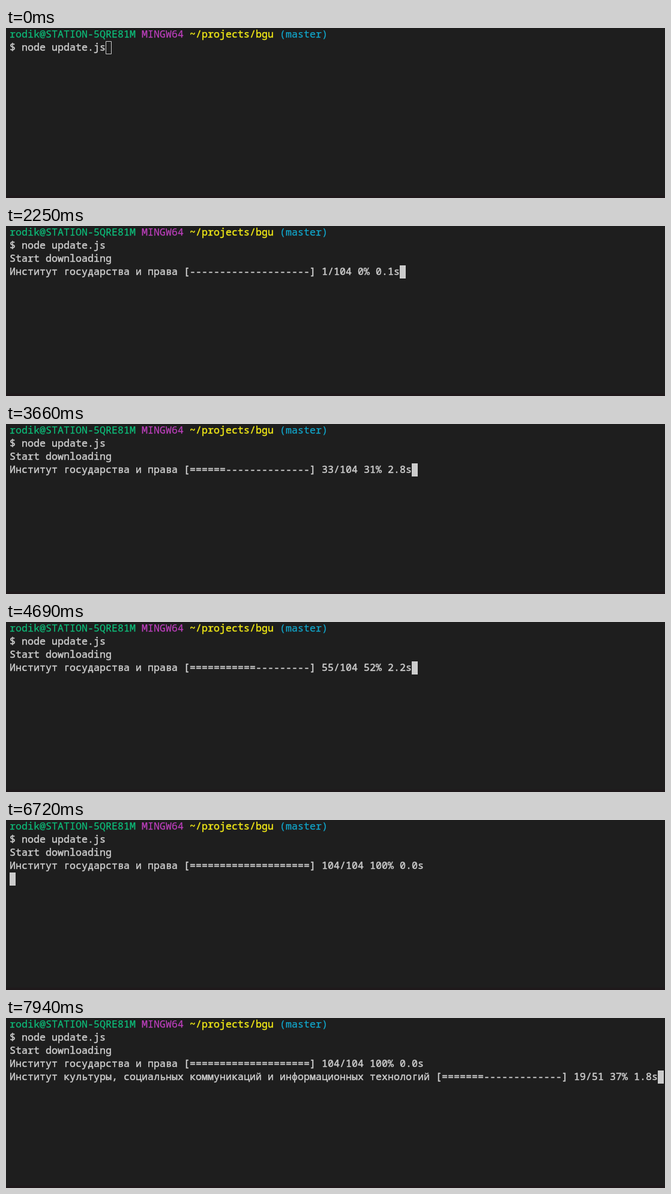
An HTML page with a canvas for the animation above (8000 ms loop, 1098 by 285 pixels).

```html
<!DOCTYPE html>
<html lang="en">
<head>
<meta charset="utf-8">
<title>Terminal download</title>
<style>
  html, body { margin: 0; width: 100%; height: 100%; overflow: hidden; background: #1e1e1e; }
  canvas { display: block; }
</style>
</head>
<body>
<canvas id="stage" width="1098" height="285"></canvas>
<script>
const ctx = document.getElementById('stage').getContext('2d');
const LOOP = 8000;
const CELL = 10, ROW = 22, LEFT = 6, BASELINE = 16;
const COLOR = {
  back: '#1e1e1e', edge: '#1f191b', text: '#cccccc',
  green: '#0dbc79', magenta: '#bc3fbc', yellow: '#eee616', cyan: '#11a8cd'
};

const PROMPT = [
  ['rodik@STATION-5QRE81M ', COLOR.green],
  ['MINGW64 ', COLOR.magenta],
  ['~/projects/bgu ', COLOR.yellow],
  ['(master)', COLOR.cyan]
];

// Key points: repaint number, items done, seconds elapsed
const JOBS = [
  {
    name: 'Институт государства и права', total: 104,
    keys: [[0, 1, 0.001], [7, 33, 1.3], [12, 55, 2.47], [17, 79, 3.48], [22, 104, 4.4]]
  },
  {
    name: 'Институт культуры, социальных коммуникаций и информационных технологий', total: 51,
    keys: [[23, 1, 0.002], [24, 6, 0.25], [28, 19, 1.07]]
  }
];

// The terminal repaints at a steady pace and misses one repaint in twelve
function repaintAt(t) {
  const n = Math.floor((t - 2235) / 203.3);
  return n % 12 === 6 ? n - 1 : n;
}

function interpolate(keys, n) {
  const next = keys.findIndex(key => key[0] > n);
  if (next < 0) return keys[keys.length - 1];
  const a = keys[next - 1], b = keys[next];
  const p = (n - a[0]) / (b[0] - a[0]);
  return a.map((value, i) => value + (b[i] - value) * p);
}

function write(text, col, row, color = COLOR.text) {
  ctx.fillStyle = ctx.strokeStyle = color;
  // Light and yellow text looks heavier than the other colours
  ctx.lineWidth = color === COLOR.text || color === COLOR.yellow ? 0.5 : 0.25;
  [...text].forEach((ch, i) => {
    if (ch === ' ') return;
    const x = LEFT + (col + i) * CELL, y = row * ROW + BASELINE;
    ctx.fillText(ch, x, y);
    ctx.strokeText(ch, x, y);
  });
  return col + text.length;
}

function cursor(col, row, focused) {
  const x = LEFT + col * CELL, y = row * ROW;
  if (focused) {
    ctx.fillStyle = COLOR.text;
    ctx.fillRect(x, y, CELL, ROW);
  } else {
    ctx.strokeStyle = COLOR.text;
    ctx.lineWidth = 1;
    ctx.strokeRect(x + 0.5, y + 0.5, CELL - 1, ROW - 1);
  }
}

function progress(name, total, done, elapsed) {
  const size = 20, full = Math.round(size * done / total);
  const bar = '='.repeat(full) + '-'.repeat(size - full);
  const percent = Math.floor(100 * done / total);
  const left = elapsed * (total / done - 1);
  return `${name} [${bar}] ${done}/${total} ${percent}% ${left.toFixed(1)}s`;
}

function draw(t) {
  ctx.fillStyle = COLOR.back;
  ctx.fillRect(0, 0, 1098, 285);
  ctx.fillStyle = COLOR.edge;
  ctx.fillRect(0, 281, 1098, 4);
  ctx.font = '16.667px "Noto Sans Mono", "DejaVu Sans Mono", monospace';
  ctx.textBaseline = 'alphabetic';
  ctx.lineJoin = 'round';

  let col = 0, row = 1;
  for (const [text, color] of PROMPT) col = write(text, col, 0, color);
  col = write('$ node update.js', 0, row);

  if (t >= 1230) [col, row] = [0, 2];
  if (t >= 1430) {
    write('Start downloading', 0, 2);
    row = 3;
  }
  const repaint = repaintAt(t);
  for (const { name, total, keys } of JOBS) {
    if (repaint < keys[0][0]) break;
    const [, items, elapsed] = interpolate(keys, repaint);
    const done = Math.round(items);
    col = write(progress(name, total, done, elapsed), 0, row);
    if (done === total) {
      col = 0;
      row++;
    }
  }
  cursor(col, row, t >= 220);
}

const start = performance.now();
function tick() {
  draw((performance.now() - start) % LOOP);
  requestAnimationFrame(tick);
}
tick();
</script>
</body>
</html>
```
